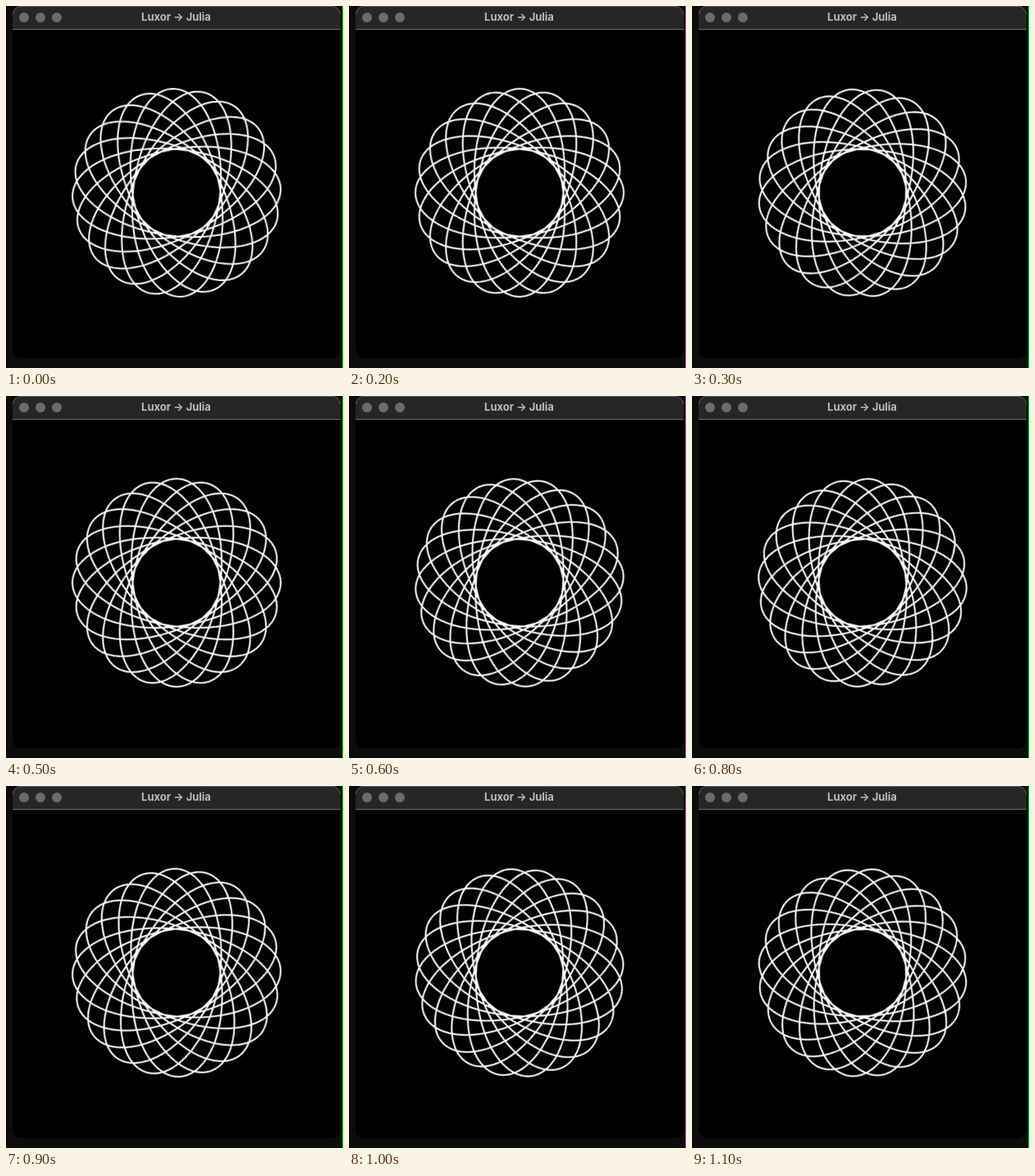
An HTML page that plays this animation: 411x442 px, repeating every 1200 ms.

```html
<!DOCTYPE html>
<html lang="en">
<head>
<meta charset="utf-8">
<title>Luxor -> Julia</title>
<style>
  html, body { margin: 0; width: 100%; height: 100%; overflow: hidden; background: #0c0c0c; }
  svg { display: block; }
  .title { font: bold 13px Inter, "Liberation Sans", sans-serif; fill: #bdbdbd; text-anchor: middle; }
  #curve {
    fill: none; stroke: #fff; stroke-width: 2; stroke-linejoin: round;
    animation: spin 1200ms step-end infinite;
  }
  /* The window redraws about every 100 ms, so each pose is held. */
  @keyframes spin {
    0%      { transform: rotate(-2.4deg); }
    16.667% { transform: rotate(-18deg); }
    25%     { transform: rotate(-25.6deg); }
    33.333% { transform: rotate(-30.8deg); }
    41.667% { transform: rotate(-36deg); }
    50%     { transform: rotate(-40.5deg); }
    58.333% { transform: rotate(-45deg); }
    66.667% { transform: rotate(-50.1deg); }
    75%     { transform: rotate(-55.2deg); }
    83.333% { transform: rotate(-60.1deg); }
    91.667%, 100% { transform: rotate(-65deg); }
  }
</style>
</head>
<body>
<svg width="411" height="442" viewBox="0 0 411 442">
  <rect x="8" y="0" width="400" height="430" rx="10" fill="#000"/>
  <path d="M8 28V10A10 10 0 0 1 18 0H398A10 10 0 0 1 408 10V28Z" fill="#262626"/>
  <path d="M8.5 10A9.5 9.5 0 0 1 18 .5H398A9.5 9.5 0 0 1 407.5 10" fill="none" stroke="#606060"/>
  <rect x="8" y="28" width="400" height="1" fill="#6a6a6a"/>
  <g fill="#6b6b6b">
    <circle cx="22" cy="14" r="6"/>
    <circle cx="42" cy="14" r="6"/>
    <circle cx="62" cy="14" r="6"/>
  </g>
  <text class="title" x="207.5" y="18">Luxor -&gt; Julia</text>
  <rect x="410" y="0" width="1" height="442" fill="#149c14"/>
  <g transform="translate(208 228)"><path id="curve"/></g>
</svg>
<script>
  // Hypotrochoid: fixed circle R, rolling circle r, pen distance d.
  function hypotrochoid(R, r, d, turns, steps) {
    const points = [];
    for (let i = 0; i < steps; i++) {
      const t = i / steps * turns * 2 * Math.PI;
      const u = t * (R - r) / r;
      const x = (R - r) * Math.cos(t) + d * Math.cos(u);
      const y = (R - r) * Math.sin(t) - d * Math.sin(u);
      points.push(x.toFixed(2) + " " + y.toFixed(2));
    }
    return "M" + points.join("L") + "Z";
  }
  document.getElementById("curve").setAttribute("d", hypotrochoid(200, 110, 37, 11, 1320));
</script>
</body>
</html>
```
